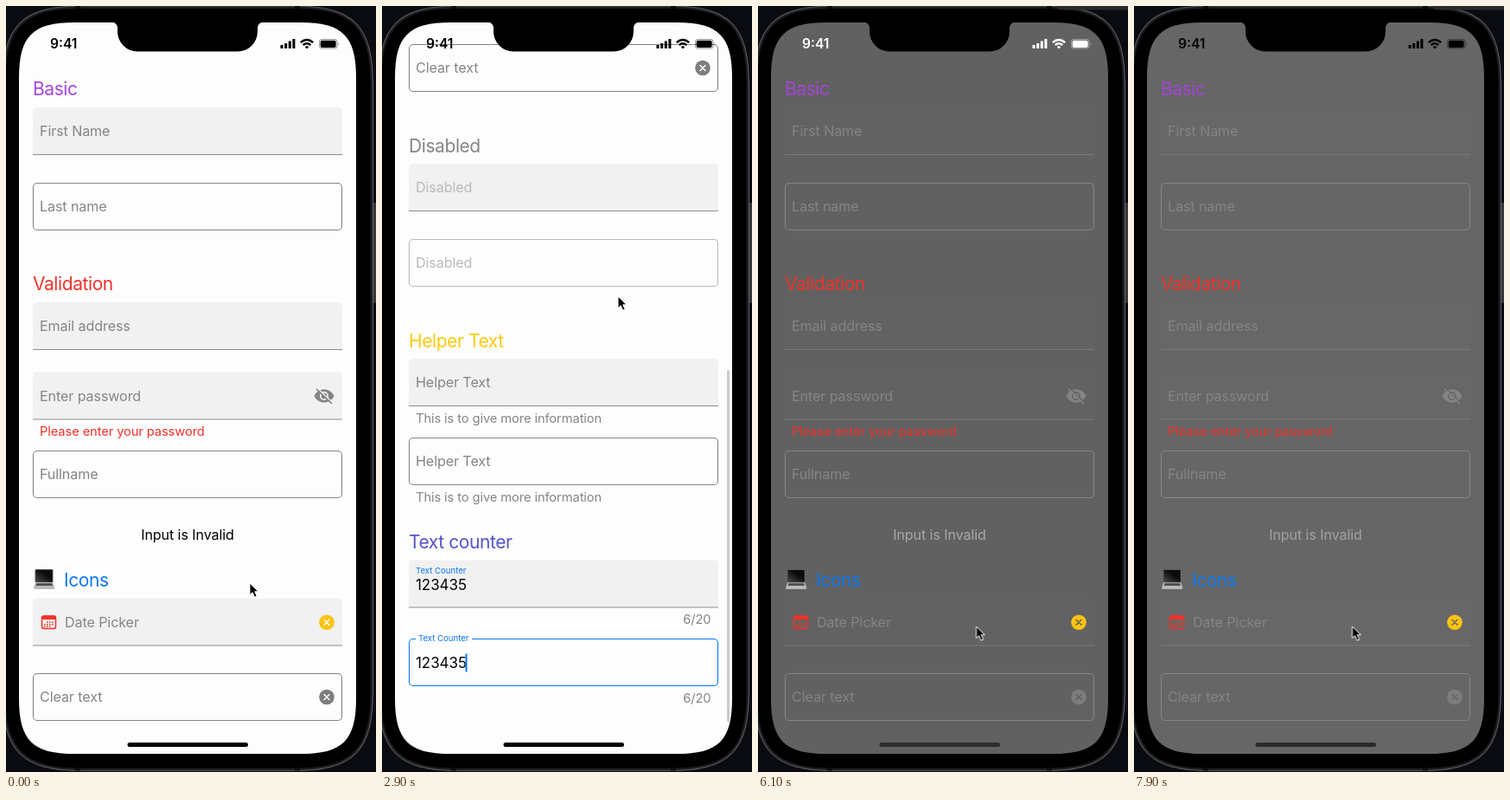
An HTML page that plays this animation: 428 px wide and 884 px high, repeating every 8000 ms.

```html
<!DOCTYPE html>
<html lang="en">
<head>
<meta charset="utf-8">
<title>Text fields</title>
<style>
html, body { margin: 0; width: 100%; height: 100%; overflow: hidden; background: #0a0b10; }
svg { display: block; width: 428px; height: 884px; font-family: Inter, Roboto, sans-serif; }
text { white-space: pre; }
.title { font-size: 21px; letter-spacing: -.42px; }
.body { font-size: 16.1px; letter-spacing: -.1px; }
.value { font-size: 16.9px; }
.note { font-size: 14.7px; letter-spacing: -.1px; }
.tiny { font-size: 9.6px; }
.bg { fill: #fdfdfd; }
.bgline { stroke: #fdfdfd; fill: none; }
.fill { fill: #f1f1f1; }
.line { stroke: #8c8c8c; }
.ink, .status, .home { fill: #000; }
</style>
</head>
<body>
<svg viewBox="0 0 428 884">
  <defs>
    <clipPath id="clip"><path id="screen"/></clipPath>
    <linearGradient id="lid" x1="1" x2="0" y2="1"><stop offset=".4" stop-color="#0c0c0c"/><stop offset="1" stop-color="#474747"/></linearGradient>
  </defs>
  <rect x="423" y="227" width="5" height="116" rx="1" fill="#38393c"/>
  <path id="frame" fill="#1c1d1f" stroke="#55565a" stroke-width="1.200"/>
  <path id="bezel"/>
  <path d="M80 1.500h6M334 1.500h6M80 881h6M334 881h6" stroke="#0c0c0d" stroke-width="3"/>
  <g clip-path="url(#clip)">
    <rect class="bg" x="15" y="19" width="390" height="844"/>
    <g id="page"></g>
    <rect id="bar" x="399" y="69" width="3" height="406" rx="1.500" fill="#8b8b8e"/>
    <rect class="home" x="140.500" y="850" width="139.500" height="5" rx="2.500"/>
  </g>
  <path d="M122 18.500a7 7 0 0 1 7 7v4a23 23 0 0 0 23 23h116a23 23 0 0 0 23-23v-4a7 7 0 0 1 7-7z"/>
  <text class="status" x="51" y="49.300" font-size="15.600" font-weight="600">9:41</text>
  <path class="status" d="M317.500 45h3v4h-3zM322.200 43h3v6h-3zM326.800 40.500h3v8.500h-3zM331.400 38h3v11h-3z"/>
  <path class="status" d="M340 41.200Q348 34.300 356 41.200L354.300 43Q348 37.500 341.700 43zM342.800 44.200Q348 39.700 353.200 44.200L351.400 46Q348 43.200 344.600 46zM345.700 47.100Q348 45.200 350.300 47.100L348 49.500z"/>
  <path class="status" opacity=".4" fill-rule="evenodd" d="M365.500 38h14.500q3.500 0 3.500 3.500v4.500q0 3.500-3.500 3.500h-14.500q-3.500 0-3.500-3.500v-4.500q0-3.500 3.500-3.500zm0 1q-2.500 0-2.500 2.500v4.500q0 2.500 2.500 2.500h14.500q2.500 0 2.500-2.500v-4.500q0-2.500-2.500-2.500zM384.500 42q2 1.700 0 4z"/>
  <rect class="status" x="363.700" y="39.700" width="18" height="8.200" rx="2"/>
  <rect id="strip" x="344" y="-8" width="100" height="12.500" rx="7" fill="#2b2b2d"/>
  <path id="cursor" d="M0 0V13.600L3.200 10.700 5.600 16.200 8.200 15.100 5.800 9.800H10z" stroke="#fff" stroke-width="1"/>
</svg>
<script>
const LOOP = 8000, END = 726;
const GRAY = '#858588', PALE = '#b9b9bc', BLUE = '#0a78f5', RED = '#f0322a';
const $ = id => document.getElementById(id);

// Rectangle whose corners ease into the sides.
const smooth = (x, y, w, h, r) => {
  const e = r * 1.35, c = r * .331, f = e - c;
  return `M${x + e} ${y}h${w - 2 * e}c${f} 0 ${e} ${c} ${e} ${e}v${h - 2 * e}c0 ${f} ${-c} ${e} ${-e} ${e}` +
    `h${2 * e - w}c${-f} 0 ${-e} ${-c} ${-e} ${-e}v${2 * e - h}c0 ${-f} ${c} ${-e} ${e} ${-e}z`;
};
$('screen').setAttribute('d', smooth(15, 19, 390, 844, 47.5));
$('frame').setAttribute('d', smooth(-4, 0, 428.5, 882.5, 68));
$('bezel').setAttribute('d', smooth(-1, 3, 422.5, 876.5, 65));

// Texts are placed by the middle of their capitals.
const SIZE = { title: 21, body: 16.1, value: 16.9, note: 14.7, tiny: 9.6 };
const text = (cls, x, mid, str, color, anchor = 'start') => {
  const look = color ? `class="${cls}" fill="${color}"` : `class="${cls} ink"`;
  return `<text ${look} x="${x}" y="${mid + SIZE[cls] * .364}" text-anchor="${anchor}">${str}</text>`;
};
const title = (mid, str, color, x = 31) => text('title', x, mid, str, color);
const note = (mid, str, color = GRAY) => text('note', 39, mid, str, color);
const count = mid => text('note', 380.5, mid, '6/20', GRAY, 'end');
const label = (y, str, color, x) => str ? text('body', x, y + 27.5, str, color) : '';
const filled = (y, str, color = GRAY, x = 39) =>
  `<path class="fill" d="M31 ${y + 54.5}v-50q0-4.500 4.500-4.500h349q4.500 0 4.500 4.500v50z"/>
   <path class="line" d="M31 ${y + 54.5}h358"/>` + label(y, str, color, x);
const outlined = (y, str, color = GRAY) =>
  `<rect x="31.500" y="${y + .5}" width="357" height="54" rx="4.500" fill="none" stroke="${color}" stroke-width="1.100"/>` +
  label(y, str, color, 39);
const clear = (y, color) =>
  `<circle cx="371" cy="${y}" r="8.800" fill="${color}"/>
   <path class="bgline" d="M368 ${y - 3}l6 6m0-6l-6 6" stroke-width="1.500" stroke-linecap="round"/>`;

const eye = `<g transform="translate(368 450)">
  <path d="M-11.500 0C-7-10 7-10 11.500 0C7 10-7 10-11.500 0z" fill="${GRAY}"/>
  <circle class="bgline" r="4.200" stroke-width="1.600"/>
  <path class="bgline" d="M-7.500-8.500L9.500 7.500" stroke-width="1.400"/>
  <path d="M-8.500-7.700L8.500 8.300" stroke="${GRAY}" stroke-width="1.600" stroke-linecap="round"/></g>`;
const calendar = `<rect x="41.500" y="704" width="16" height="14.600" rx="2.500" fill="none" stroke="${RED}" stroke-width="1.500"/>
  <path d="M41 708v-2q0-2.500 2.500-2.500h12q2.500 0 2.500 2.500v2z" fill="${RED}"/>
  <path d="M47 711.300h8.500M44 713.700h11.500M44 716.100h8.500" stroke="${RED}" stroke-width="1.500" stroke-dasharray="1.600 1.400"/>`;
const laptop = `<rect x="33.500" y="650" width="21" height="15.500" rx="1.200" fill="#666"/>
  <rect x="34.300" y="650.800" width="19.400" height="14" fill="url(#lid)"/>
  <path d="M34 665.500h20.500l1.800 6q0 1.500-1.500 1.500h-21.200q-1.500 0-1.500-1.500z" fill="#b9b9bb"/>
  <path d="M35.500 666.300h17.500l1 2.700h-19.500z" fill="#4c4c4e"/>`;

$('page').innerHTML = [
  title(95.5, 'Basic', '#a544d8'), filled(117, 'First Name'), outlined(204, 'Last name'),
  title(320.5, 'Validation', RED), filled(342, 'Email address'), filled(422.5, 'Enter password'), eye,
  note(491, 'Please enter your password', RED), outlined(513, 'Fullname'),
  text('body', 210, 610, 'Input is Invalid', '', 'middle'),
  laptop, title(662, 'Icons', BLUE, 67),
  filled(683.5, 'Date Picker', GRAY, 68), calendar, clear(711.3, '#fcc30f'),
  outlined(770, 'Clear text'), clear(797.5, '#7d7d80'),
  title(887, 'Disabled', GRAY), filled(908, 'Disabled', PALE), outlined(995, 'Disabled', PALE),
  title(1112, 'Helper Text', '#fbca0c'), filled(1133, 'Helper Text'), note(1202, 'This is to give more information'),
  outlined(1224, 'Helper Text'), note(1293, 'This is to give more information'),
  title(1344.5, 'Text counter', '#5452c8'), filled(1365.5, ''),
  text('tiny', 39, 1377.5, 'Text Counter', BLUE), text('value', 39, 1393.5, '123435'), count(1434),
  outlined(1456, '', BLUE), '<rect class="bg" x="39" y="1454" width="65" height="5"/>',
  text('tiny', 42, 1456, 'Text Counter', BLUE), text('value', 39, 1484, '123435'),
  `<rect x="96.500" y="1473.500" width="2" height="21" fill="${BLUE}"/>`, count(1525)
].join('');

const start = document.timeline.currentTime || 0;
// Each step: [time, value, easing towards the next step].
const play = (el, steps, frame) => {
  const all = [...steps];
  const last = all[all.length - 1];
  if (last[0] < LOOP) all.push([LOOP, last[1]]);
  const keys = all.map(([t, v, easing = 'linear']) => ({ offset: t / LOOP, easing, ...frame(v) }));
  el.animate(keys, { duration: LOOP, iterations: Infinity }).startTime = start;
};

const SETTLE = 'cubic-bezier(.2,.6,.3,1)', PULL = 'cubic-bezier(.45,.05,.8,.75)';
const scroll = [
  [0, 0], [250, 0, PULL], [700, 300], [1040, END, 'ease-out'], [1130, END + 32, 'ease-in'],
  [1200, END + 22, SETTLE], [1800, END], [3000, END, PULL], [3450, 345],
  [3820, 0, 'ease-out'], [3910, -22, SETTLE], [4300, 0]
];
play($('page'), scroll, s => ({ transform: `translateY(${-s}px)` }));
play($('bar'), scroll, s => {
  const inside = Math.min(END, Math.max(0, s)), over = Math.abs(s - inside);
  return { y: `${69 + inside * 351 / END + Math.max(0, s - END)}px`, height: `${406 - over}px` };
});
const opacity = v => ({ opacity: v });
play($('bar'), [[0, 0], [270, 0], [370, 1], [2780, 1], [2900, .45], [3000, .35], [3100, 1], [5200, 1], [5450, 0]], opacity);
play($('strip'), [[0, 0, 'step-end'], [4700, 1]], opacity);
play($('cursor'), [
  [0, [282, 666]], [250, [282, 666], PULL], [720, [283, 359]], [2000, [283, 359], 'ease-in-out'],
  [2500, [273, 335]], [3000, [273, 335], PULL], [3480, [252.5, 716]]
], ([x, y]) => ({ transform: `translate(${x}px, ${y}px)` }));

// Light to dark and back; the loop ends inside the second fade.
const ramp = [0, .13, .36, .655, .9, 1];
const theme = [[0, 0], ...ramp.map((k, i) => [5800 + i * 100, k]),
  ...ramp.slice(0, 4).map((k, i) => [7700 + i * 100, 1 - k])];
const fade = (cls, light, dark, prop = 'fill') => {
  for (const el of document.querySelectorAll('.' + cls))
    play(el, theme, k => {
      const v = Math.round(light + (dark - light) * k);
      return { [prop]: `rgb(${v},${v},${v})` };
    });
};
fade('bg', 253, 16);
fade('bgline', 253, 16, 'stroke');
fade('fill', 241, 24);
fade('line', 140, 112, 'stroke');
fade('ink', 0, 255);
fade('home', 0, 68);
for (const el of document.querySelectorAll('.status'))
  play(el, [[0, '#000', 'step-end'], [5800, '#fff', 'step-end'], [7680, '#000', 'step-end']], fill => ({ fill }));
</script>
</body>
</html>
```
